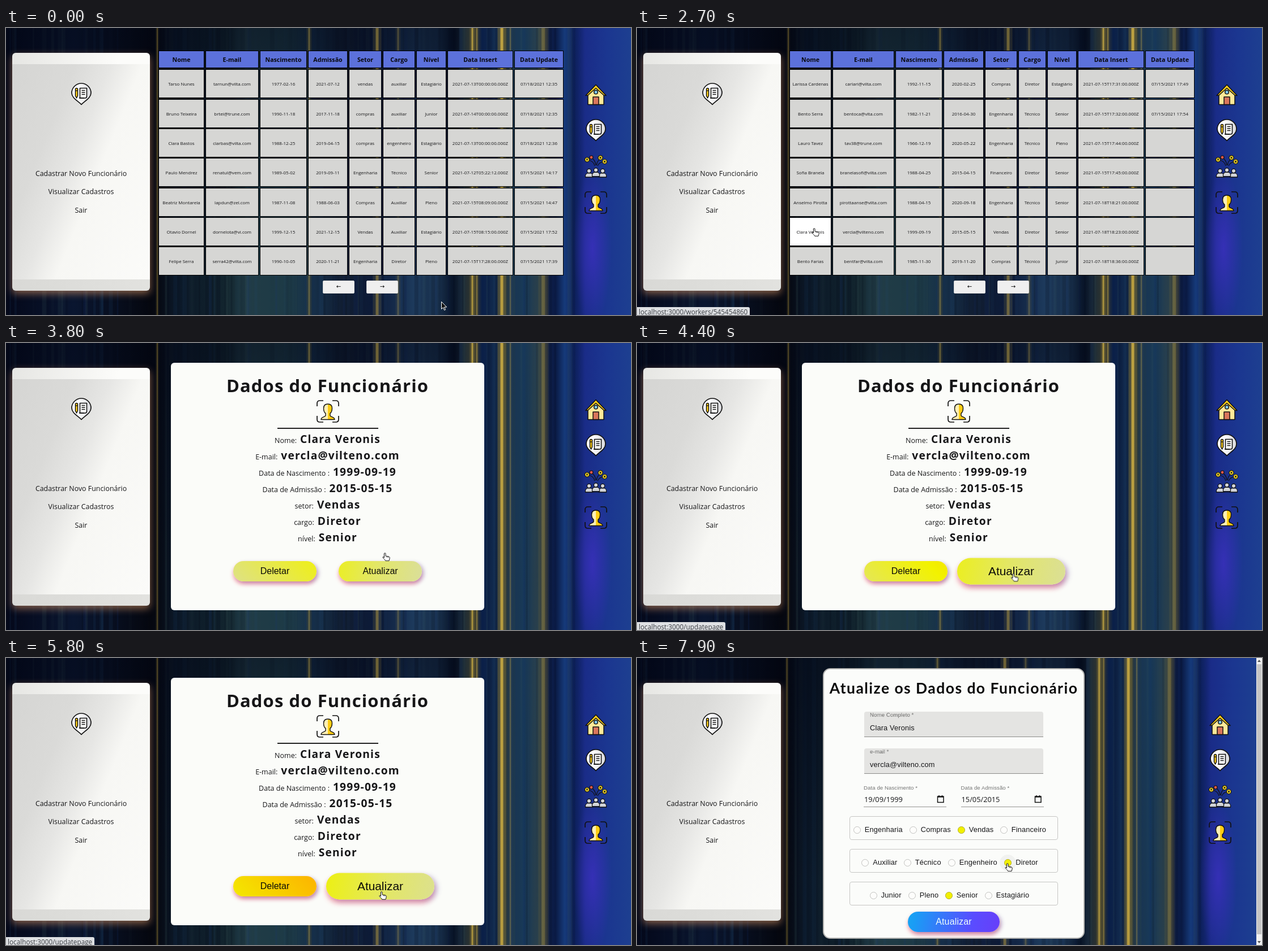
Recreate the animation shown at these times as an HTML page with a canvas. Size 1103 by 508 pixels, loop 8000 ms.

```html
<!DOCTYPE html>
<html lang="pt">
<head>
<meta charset="utf-8">
<title>Cadastro de funcionários</title>
<style>
html, body { margin: 0; width: 100%; height: 100%; overflow: hidden; background: #050a18; }
#stage { position: relative; width: 1103px; height: 508px; overflow: hidden; font-family: "Open Sans", "Noto Sans", sans-serif; color: #161618; }
#stage * { box-sizing: border-box; }
.abs, section, canvas, aside, nav, .cell, .page, .pager, .t, .pill, .field, .date, .box, .radio, .status, .cursor, .cursor svg, svg.ico { position: absolute; }
section, .page, nav { left: 0; top: 0; width: 1103px; height: 508px; }
.t { white-space: nowrap; line-height: 20px; height: 20px; }
.mid { text-align: center; }
.s1, .s2, .s3, .p1, .p2, nav, canvas { animation: 8s step-end infinite; }
canvas { left: 0; top: 0; transform-origin: 0 0; animation-name: squeeze; }
nav { animation-name: nudge; }
.s1 { animation-name: first; }
.s2 { animation-name: second; }
.s3 { animation-name: third; }
.p1 { animation-name: pageOne; }
.p2 { animation-name: pageTwo; }
@keyframes squeeze { 0% { transform: none } 83.75%, 100% { transform: scaleX(.991) } }
@keyframes nudge { 0% { transform: none } 83.75%, 100% { transform: translateX(-12px) } }
@keyframes first { 0% { opacity: 1 } 38.75%, 100% { opacity: 0 } }
@keyframes second { 0% { opacity: 0 } 38.75% { opacity: 1 } 83.75%, 100% { opacity: 0 } }
@keyframes third { 0% { opacity: 0 } 83.75%, 100% { opacity: 1 } }
@keyframes pageOne { 0% { opacity: 1 } 11.25%, 100% { opacity: 0 } }
@keyframes pageTwo { 0% { opacity: 0 } 11.25%, 100% { opacity: 1 } }

aside { left: 11px; top: 44px; width: 243px; height: 421px; border-radius: 6px;
  background: linear-gradient(90deg, #d9d9d6, #e2e2df) 0 100% / 100% 40px no-repeat, linear-gradient(100deg, #e6e6e3, #fcfcfa 60%);
  box-shadow: 0 5px 14px rgba(255, 175, 115, .5); }
.inner { left: 0; top: 20px; width: 243px; height: 381px;
  background: linear-gradient(112deg, #d5d5d3 0, #dadad8 28%, #e6e6e4 44%, #f7f7f4 58%, #fbfbf9 100%); }
.menu { left: 11px; width: 243px; font-size: 12.4px; }

.cell { display: flex; align-items: center; justify-content: center; white-space: nowrap;
  border: 1px solid #000; background: #d6d6d4; font-size: 8px; }
.head { background: #5c71db; font-size: 10.65px; font-weight: 700; color: #08080c; }
.hit { animation: hit 8s step-end infinite; }
.rest { animation: rest 8s step-end infinite; }
@keyframes hit { 0% { background: #fff } 1.25%, 100% { background: #d6d6d4 } }
@keyframes rest { 0% { background: #fff } 12.5%, 100% { background: #d6d6d4 } }
.pager { top: 447px; width: 56px; height: 23px; border-radius: 2px; background: #efefef; border: 1px solid #d4d4d4;
  font: 10px/20px "DejaVu Sans", sans-serif; text-align: center; color: #000; }
.next { animation: press 8s step-end infinite; }
@keyframes press { 0% { background: #efefef } 5% { background: #e2e2e2 } 7.5% { background: #f5f5f5 } 8.75% { background: #e2e2e2 } 18.75%, 100% { background: #efefef } }

.card { left: 291px; top: 35px; width: 553px; height: 438px; border-radius: 6px; background: #fbfcf9; }
.title { left: 291px; width: 553px; top: 55px; height: 40px; line-height: 40px; font-size: 31px; font-weight: 700; letter-spacing: 1.1px; }
.line { position: absolute; left: 291px; width: 553px; height: 30px; display: flex; justify-content: center; align-items: baseline; gap: 6px; font-size: 12.5px; line-height: 30px; white-space: nowrap; }
.line b { font-size: 19.2px; letter-spacing: 1.2px; }
.pill { display: block; border-radius: 18px; height: 36px; text-align: center; font: 16px/36px "Liberation Sans", Arial, sans-serif; color: #0c0c08;
  box-shadow: 4px 3px 7px rgba(90, 70, 160, .32), 0 5px 7px rgba(245, 60, 85, .45); }
.del { left: 401px; top: 386px; width: 147px; background: linear-gradient(45deg, #d8dcae 0, #f2f200 52%, #ffa500 100%) 0 50% / 300% 300%; animation: sweep 8s linear infinite; }
.upd { left: 587px; top: 386px; width: 147px; background: linear-gradient(100deg, #eff200 0, #e3e764 45%, #d7dbb0 100%) 40% 0 / 150% 100%; animation: grow 8s linear infinite; }
.save { left: 478px; top: 449px; width: 162px; color: #effffb; background: linear-gradient(100deg, #00ffc8 0, #1a9cf5 45%, #5a4cff 70%, #7a2cf0 100%) 0 0 / 250% 100%; animation: cool 8s linear infinite; }
@keyframes sweep { 0%, 38.75% { background-position: 0 50% } 47.5% { background-position: 10% 50% } 62.5% { background-position: 62% 50% } 72.5%, 100% { background-position: 96% 50% } }
@keyframes grow {
  0%, 38.75% { background-position: 60% 0; transform: none }
  50% { transform: none; animation-timing-function: ease }
  53.75% { transform: scale(1.3) }
  72.5%, 100% { background-position: 25% 0; transform: scale(1.3) }
}
@keyframes cool { 0%, 83.75% { background-position: 4% 0 } 98.75%, 100% { background-position: 70% 0 } }

.form { left: 328px; top: 18px; width: 462px; height: 479px; border: 2px solid #b4b4b2; border-radius: 13px; background: #fbfcfa; }
.s3 { font: 12.8px "Liberation Sans", Arial, sans-serif; letter-spacing: .15px; }
.big { left: 328px; width: 462px; top: 33px; height: 40px; font: 700 26.5px/40px Lato, sans-serif; letter-spacing: 1.45px; color: #0a0a0a; }
.field { left: 401px; width: 316px; height: 45px; border-radius: 4px 4px 0 0; background: #e4e4e2; border-bottom: 1px solid #8b8b89; }
.label { color: rgba(0, 0, 0, .54); transform-origin: 0 50%; }
.float { animation: float 8s linear infinite; }
@keyframes float { 0%, 85% { transform: none; animation-timing-function: ease-out } 87.5%, 100% { transform: translateY(-9px) scale(.75) } }
.filled { animation: filled 8s step-end infinite; }
.empty { animation: empty 8s step-end infinite; }
@keyframes filled { 0% { opacity: 0 } 85%, 100% { opacity: 1 } }
@keyframes empty { 0% { opacity: 1 } 85%, 100% { opacity: 0 } }
.date { width: 146px; top: 222px; height: 42px; border-bottom: 1px solid #949492; }
.date .t { left: 1px; top: 18px; font-family: "Open Sans", "Noto Sans", sans-serif; letter-spacing: 0; }
.date .label { left: 0; top: -2px; font: 9.6px/20px "Liberation Sans", Arial, sans-serif; letter-spacing: .09px; }
.date svg { position: absolute; left: 129px; top: 20px; }
.box { left: 375px; width: 368px; height: 42px; border: 1.5px solid #c6c6c4; border-radius: 4px; }
.radio { width: 13px; height: 13px; border-radius: 50%; border: 1px solid #c0c0be; background: #fdfdfb; }
.radio i { position: absolute; inset: -1px; border-radius: 50%; background: #f1f000; border: 1px solid #b9b42c; }
.halo { left: 640px; top: 347.5px; width: 29px; height: 29px; border-radius: 50%; background: rgba(0, 0, 0, .04); animation: halo 8s step-end infinite; }
@keyframes halo { 0% { opacity: 0 } 97.5%, 100% { opacity: 1 } }
.scroll { right: 0; top: 0; width: 10px; height: 508px; background: #f1f1f1; }
.scroll i { position: absolute; left: 1px; top: 11px; width: 8px; height: 478px; background: #c4c4c4; }

.status { left: 0; top: 494px; height: 14px; padding: 0 4px 0 3px; border-radius: 0 3px 0 0; background: #dee0e3; color: #3b3e43; font-size: 11.75px; line-height: 17px; white-space: nowrap; overflow: hidden; }
.st1 { animation: linkOne 8s linear infinite; }
.st2 { animation: linkTwo 8s linear infinite; }
@keyframes linkOne { 0%, 28.75% { opacity: 0 } 31.25%, 38.74% { opacity: 1 } 38.75%, 100% { opacity: 0 } }
@keyframes linkTwo { 0%, 51.25% { opacity: 0 } 53.75%, 77.5% { opacity: 1 } 81.25%, 100% { opacity: 0 } }

.cursor { left: 0; top: 0; animation: move 8s linear infinite; }
.cursor svg { left: 0; top: 0; overflow: visible; }
.arrow { animation: arrow 8s step-end infinite; }
.hand { animation: hand 8s step-end infinite; }
@keyframes arrow { 0% { opacity: 1 } 20% { opacity: 0 } 38.75% { opacity: 1 } 45%, 100% { opacity: 0 } }
@keyframes hand { 0% { opacity: 0 } 20% { opacity: 1 } 38.75% { opacity: 0 } 45%, 100% { opacity: 1 } }
@keyframes move {
  0%, 1.25% { transform: translate(764px, 484px) }
  5%, 6.25% { transform: translate(666px, 459px) }
  7.5%, 16.25% { transform: translate(664px, 457px) }
  17.5% { transform: translate(648px, 452px) }
  21.25% { transform: translate(570px, 421px) }
  22.5% { transform: translate(510px, 408px) }
  23.75% { transform: translate(430px, 396px) }
  25% { transform: translate(365px, 380px) }
  26.25% { transform: translate(326px, 366px) }
  27.5% { transform: translate(314px, 360px) }
  33.75%, 38.75% { transform: translate(308px, 354px); animation-timing-function: ease-in-out }
  47.5% { transform: translate(664px, 371px) }
  50% { transform: translate(664px, 384px) }
  53.75% { transform: translate(660px, 406px) }
  60%, 82.5% { transform: translate(658px, 413px) }
  83.75% { transform: translate(659px, 413px) }
  88.75% { transform: translate(668px, 408px) }
  93.75% { transform: translate(664px, 396px) }
  98.75%, 100% { transform: translate(649px, 363px) }
}
</style>
</head>
<body>
<svg width="0" height="0" style="position:absolute">
  <linearGradient id="silver"><stop offset=".3" stop-color="#fff"/><stop offset="1" stop-color="#d9dade"/></linearGradient>
  <linearGradient id="gold"><stop offset=".48" stop-color="#fff0b4"/><stop offset=".52" stop-color="#ffcd14"/></linearGradient>
  <g id="bust"><path d="M-6.500 8v-2.500a4.500 4.500 0 0 1 4.500-4.500h4a4.500 4.500 0 0 1 4.500 4.500V8z"/><circle cy="-3" r="3.600"/></g>
  <symbol id="house" viewBox="0 0 40 40" stroke="#111" stroke-width="1.500" stroke-linejoin="round">
    <path d="M6 18L20 6l14 12v19.500H6z" fill="#ffe999"/>
    <path d="M2 21.500L20 2.500l18 19-4-.5L20 8.500 6 21z" fill="#ffd01c"/>
    <circle cx="20" cy="15.500" r="3.300" fill="#7fc9f2"/>
    <path d="M15 37.500V24h10v13.500z" fill="#d9755b"/>
  </symbol>
  <symbol id="pin" viewBox="0 0 40 40" stroke="#111" stroke-width="1.700" stroke-linejoin="round">
    <path d="M20 38.500C14 32 3 27 3 18a17 17 0 0 1 34 0c0 9-11 14-17 20.500z" fill="url(#silver)"/>
    <path d="M9.500 11.500a2 2 0 0 1 4 0V23l-2 4-2-4z" fill="#ffd01c" stroke-width="1.500"/>
    <path d="M9.500 14h4" stroke-width="1.300"/>
    <path d="M17.500 9.500h12V24q0 3-3 3h-9z" fill="#fff" stroke-width="1.600"/>
    <path d="M20.500 13.500h6M20.500 17h6M20.500 20.500h6M16 27h9" stroke-width="1.400"/>
  </symbol>
  <symbol id="team" viewBox="0 0 40 40" stroke="#111" stroke-width="1.200" fill="none">
    <path d="M18 19Q16 11 8 9M20 18Q19 9 12 4M21 18Q22 10 28 7M23 19Q26 13 32 12"/>
    <g fill="#ffe02a"><circle cx="4.500" cy="8" r="4"/><circle cx="28" cy="4.600" r="4"/><circle cx="35.500" cy="11.500" r="4"/></g>
    <circle cx="12" cy="4" r="3" fill="#e0574a"/>
    <path d="M3 6.500l3 3m0-3l-3 3M26.500 3.100l3 3m0-3l-3 3M34 10l3 3m0-3l-3 3"/>
    <g fill="#d3d5da"><use href="#bust" x="8" y="31"/><use href="#bust" x="32" y="31"/><use href="#bust" x="20" y="29.500"/></g>
    <path d="M1 39h38"/>
  </symbol>
  <symbol id="face" viewBox="0 0 40 40" stroke="#111" fill="none" stroke-linejoin="round">
    <path d="M1 11V6q0-5 5-5h6M28 1h6q5 0 5 5v5M39 28v6q0 5-5 5h-6M12 39H6q-5 0-5-5v-6" stroke-width="1.700"/>
    <path d="M8 34.500c0-5 7-4 8-7v-4c-3-2-3.500-5-3.500-9C12.500 9 16 7 20 7s7.500 2 7.500 7.500c0 4-.5 7-3.500 9v4c1 3 8 2 8 7z" fill="url(#gold)" stroke-width="1.400"/>
  </symbol>
</svg>

<div id="stage">
  <canvas id="bg" width="1103" height="508"></canvas>
  <aside><div class="abs inner"></div></aside>
  <svg class="ico" style="left:112.500px;top:96.500px" width="40" height="40"><use href="#pin"/></svg>
  <div class="t mid menu" style="top:248px">Cadastrar Novo Funcionário</div>
  <div class="t mid menu" style="top:280px">Visualizar Cadastros</div>
  <div class="t mid menu" style="top:313px">Sair</div>
  <nav id="nav"></nav>

  <section class="s1" id="list">
    <div class="pager" style="left:559px">←</div>
    <div class="pager next" style="left:636px">→</div>
  </section>

  <section class="s2" id="details">
    <div class="abs card"></div>
    <div class="t mid title">Dados do Funcionário</div>
    <svg class="ico" style="left:547.500px;top:100.500px" width="40" height="40"><use href="#face"/></svg>
    <div class="abs" style="left:479px;top:150px;width:178px;height:2px;background:#222"></div>
    <div class="pill del">Deletar</div>
    <div class="pill upd">Atualizar</div>
  </section>

  <section class="s3" id="edit">
    <div class="abs form"></div>
    <div class="t mid big">Atualize os Dados do Funcionário</div>
    <div class="abs scroll"><i></i>
      <svg class="ico" width="10" height="508" fill="#555"><path d="M5 3l3 4H2zM2 501h6l-3 4z"/></svg>
    </div>
    <div class="abs halo"></div>
    <div class="pill save">Atualizar</div>
  </section>

  <div class="status st1">localhost:3000/workers/545454860</div>
  <div class="status st2">localhost:3000/updatepage</div>
  <div class="cursor">
    <svg class="arrow" width="16" height="18"><path d="M4.500.5v13l3-2.800 2.100 4.800 2-.9-2.100-4.600h4.200z" fill="#111" stroke="#fff" stroke-linejoin="round"/></svg>
    <svg class="hand" width="16" height="16"><path d="M3.400 9V2a1.300 1.300 0 0 1 2.600 0v4l5 .8c1.400.3 2.200 1 2.200 2.300 0 2-.7 3.200-1.200 5.200H5.700C5 12.300 2.500 10.800 1 8.700c-.6-1 .6-1.800 1.400-1.100z" fill="#fff" stroke="#111" stroke-linejoin="round"/><path d="M8.300 6.600v2M10.600 7v1.800" stroke="#111" stroke-width=".8"/></svg>
  </div>
</div>

<script>
const byId = id => document.getElementById(id);
const add = (id, html) => byId(id).insertAdjacentHTML('beforeend', html);

// Blurred vertical streaks
const ctx = byId('bg').getContext('2d');
const base = ctx.createLinearGradient(0, 0, 1103, 0);
const tones = '0 04081a,120 0a1630,255 05070f,270 060a14,300 0a1626,395 13262f,420 213c46,500 1d3a46,540 16304a,600 101c30,650 0c1a38,720 1d3a5c,760 1a3350,790 081428,806 1a2a38,827 3c3c2c,840 0a1f48,866 12294a,875 4a4628,888 1c3448,915 17395a,940 2c4048,950 454a40,960 0c1c44,970 0a1a44,986 163a7a,1004 0c1e58,1022 1a2c88,1060 1b3690,1103 1d3f90';
tones.split(',').forEach(s => {
  const [x, c] = s.split(' ');
  base.addColorStop(x / 1103, '#' + c);
});
ctx.fillStyle = base;
ctx.fillRect(0, 0, 1103, 508);

let seed = 11;
const rnd = () => (seed = seed * 16807 % 2147483647) / 2147483647;
function streak(x, w, rgb, top, bottom) {
  const g = ctx.createLinearGradient(0, 0, 0, 508);
  g.addColorStop(0, `rgba(${rgb},${top})`);
  g.addColorStop(1, `rgba(${rgb},${bottom})`);
  ctx.fillStyle = g;
  ctx.fillRect(x - w / 2, 0, w, 508);
}
const hues = ['0,4,16', '30,70,110', '20,50,120', '60,90,90', '2,8,24'];
for (let i = 0; i < 150; i++) {
  streak(rnd() * 1010, 2 + rnd() * 6, hues[i % 5], rnd() * .16, rnd() * .2);
}
const shade = ctx.createLinearGradient(0, 0, 0, 400);
shade.addColorStop(0, 'rgba(2,6,20,.5)');
shade.addColorStop(1, 'rgba(2,6,20,0)');
ctx.fillStyle = shade;
ctx.fillRect(0, 0, 800, 400);
// x, width, strength
[[267, 2, .35], [535, 3, .4], [655, 5, .5], [692, 3, .3], [823, 3, .8], [831, 2, .5], [875, 5, .9], [890, 2, .35], [948, 6, .25]].forEach(([x, w, a]) => {
  streak(x, w * 3, '150,125,50', a * .35, a * .35);
  streak(x, w, '226,190,70', a * .8, a * .75);
});
// Soft violet glow, taller than wide
ctx.setTransform(.24, 0, 0, 1, 1035, 390);
const violet = ctx.createRadialGradient(0, 0, 0, 0, 0, 140);
violet.addColorStop(0, 'rgba(62,48,196,.75)');
violet.addColorStop(1, 'rgba(62,48,196,0)');
ctx.fillStyle = violet;
ctx.fillRect(-140, -140, 280, 280);

['house', 'pin', 'team', 'face'].forEach((n, i) =>
  add('nav', `<svg class="ico" style="left:1021px;top:${[98, 161, 225, 289][i]}px" width="40" height="40"><use href="#${n}"/></svg>`));

// Tables
const heads = 'Nome|E-mail|Nascimento|Admissão|Setor|Cargo|Nível|Data Insert|Data Update';
const pages = [
  [[269, 352, 448, 533, 605, 665, 724, 779, 897, 986], [
    'Tarso Nunes|tarnun@vilta.com|1977-02-16|2021-07-12|vendas|auxiliar|Estagiário|2021-07-13T00:00:00.000Z|07/18/2021 12:35',
    'Bruno Teixeira|brtei@trune.com|1990-11-18|2017-11-18|compras|auxiliar|Junior|2021-07-14T00:00:00.000Z|07/18/2021 12:35',
    'Clara Bastos|clarbas@vilta.com|1988-12-25|2019-04-15|compras|engenheiro|Estagiário|2021-07-13T00:00:00.000Z|07/18/2021 12:36',
    'Paulo Mendrez|renatul@vem.com|1989-05-02|2019-09-11|Engenharia|Técnico|Senior|2021-07-12T05:22:12.000Z|07/15/2021 14:17',
    'Beatriz Montarela|lapdun@zel.com|1987-11-08|1988-06-03|Compras|Auxiliar|Pleno|2021-07-15T08:09:00.000Z|07/15/2021 14:47',
    'Otavio Dornel|dornelota@vi.com|1999-12-15|2021-12-15|Vendas|Auxiliar|Estagiário|2021-07-15T08:15:00.000Z|07/15/2021 17:52',
    'Felipe Serra|serra42@vilta.com|1990-10-05|2020-11-21|Engenharia|Diretor|Pleno|2021-07-15T17:28:00.000Z|07/15/2021 17:39']],
  [[269, 345, 456, 541, 614, 673, 724, 778, 897, 986], [
    'Larissa Cardenas|carlari@vilta.com|1992-11-15|2020-02-25|Compras|Diretor|Estagiário|2021-07-15T17:31:00.000Z|07/15/2021 17:49',
    'Bento Serra|bentoca@vlta.com|1982-11-21|2016-04-30|Engenharia|Técnico|Senior|2021-07-15T17:32:00.000Z|07/15/2021 17:54',
    'Lauro Tavez|tav38@trune.com|1966-12-19|2020-05-22|Engenharia|Técnico|Pleno|2021-07-15T17:44:00.000Z|',
    'Sofia Branela|branelasofi@vilta.com|1988-04-25|2015-04-15|Financeiro|Diretor|Senior|2021-07-15T17:45:00.000Z|',
    'Anselmo Pirotta|pirottaanse@vilta.com|1988-04-15|2020-09-18|Engenharia|Técnico|Senior|2021-07-18T18:21:00.000Z|',
    'Clara Veronis|vercla@vilteno.com|1999-09-19|2015-05-15|Vendas|Diretor|Senior|2021-07-18T18:23:00.000Z|',
    'Bento Farias|bentfar@vilta.com|1985-11-30|2019-11-20|Compras|Técnico|Junior|2021-07-18T18:36:00.000Z|']]
];
pages.forEach(([xs, rows], p) => {
  const cells = [heads, ...rows].map((row, r) => row.split('|').map((text, c) => {
    const top = r ? Math.round(73.3 + 52.35 * (r - 1)) : 40;
    const w = xs[c + 1] - xs[c] - 2;
    return `<div class="cell${r ? '' : ' head'}" data-at="${r},${c}" style="left:${xs[c]}px;top:${top}px;width:${w}px;height:${r ? 51 : 31}px">${text}</div>`;
  }).join('')).join('');
  add('list', `<div class="page p${p + 1}">${cells}</div>`);
});
// Cells the pointer passes: row and column, start in ms, style
[['7,3', 1700, 'hit'], ['7,2', 1800, 'hit'], ['7,1', 1900, 'hit'], ['6,1', 2000, 'hit'], ['6,0', 2100, 'rest']].forEach(([at, ms, name]) => {
  const cell = document.querySelector(`.p2 [data-at="${at}"]`);
  cell.classList.add(name);
  cell.style.animationDelay = ms - 8000 + 'ms';
});

// Details card
[['Nome:', 'Clara Veronis'], ['E-mail:', 'vercla@vilteno.com'], ['Data de Nascimento :', '1999-09-19'], ['Data de Admissão :', '2015-05-15'],
 ['setor:', 'Vendas'], ['cargo:', 'Diretor'], ['nível:', 'Senior']].forEach(([k, v], i) =>
  add('details', `<div class="line" style="top:${154.5 + i * 29.15}px"><span>${k}</span><b>${v}</b></div>`));

// Edit form
[['Nome Completo *', 'Clara Veronis', 95], ['e-mail *', 'vercla@vilteno.com', 160]].forEach(([k, v, y]) =>
  add('edit', `<div class="field" style="top:${y}px"><div class="t label float" style="left:10px;top:5px">${k}</div><div class="t filled" style="left:10px;top:19px">${v}</div></div>`));
[['Data de Nascimento *', '19/09/1999', 400], ['Data de Admissão *', '15/05/2015', 571.5]].forEach(([k, v, x]) =>
  add('edit', `<div class="date" style="left:${x}px"><div class="t label">${k}</div><div class="t empty">dd/mm/aaaa</div><div class="t filled">${v}</div>
    <svg width="14" height="15"><path d="M1.500 3h10.500v10.500H1.500zM1.500 4h10.500M4 1v2M9.500 1v2" fill="none" stroke="#111" stroke-width="1.500"/></svg></div>`));
[[280, ['Engenharia', 388], ['Compras', 487], ['Vendas', 572], ['Financeiro', 647]],
 [338, ['Auxiliar', 402.5], ['Técnico', 477], ['Engenheiro', 555], ['Diretor', 654.5]],
 [396, ['Junior', 417], ['Pleno', 485], ['Senior', 550], ['Estagiário', 620]]].forEach(([y, ...opts]) => {
  add('edit', `<div class="box" style="top:${y}px"></div>` + opts.map(([k, x]) => {
    const on = ['Vendas', 'Diretor', 'Senior'].includes(k) ? '<i class="filled"></i>' : '';
    return `<div class="radio" style="left:${x - 6.5}px;top:${y + 17.5}px">${on}</div><div class="t" style="left:${x + 13.8}px;top:${y + 14}px">${k}</div>`;
  }).join(''));
});
</script>
</body>
</html>
```
